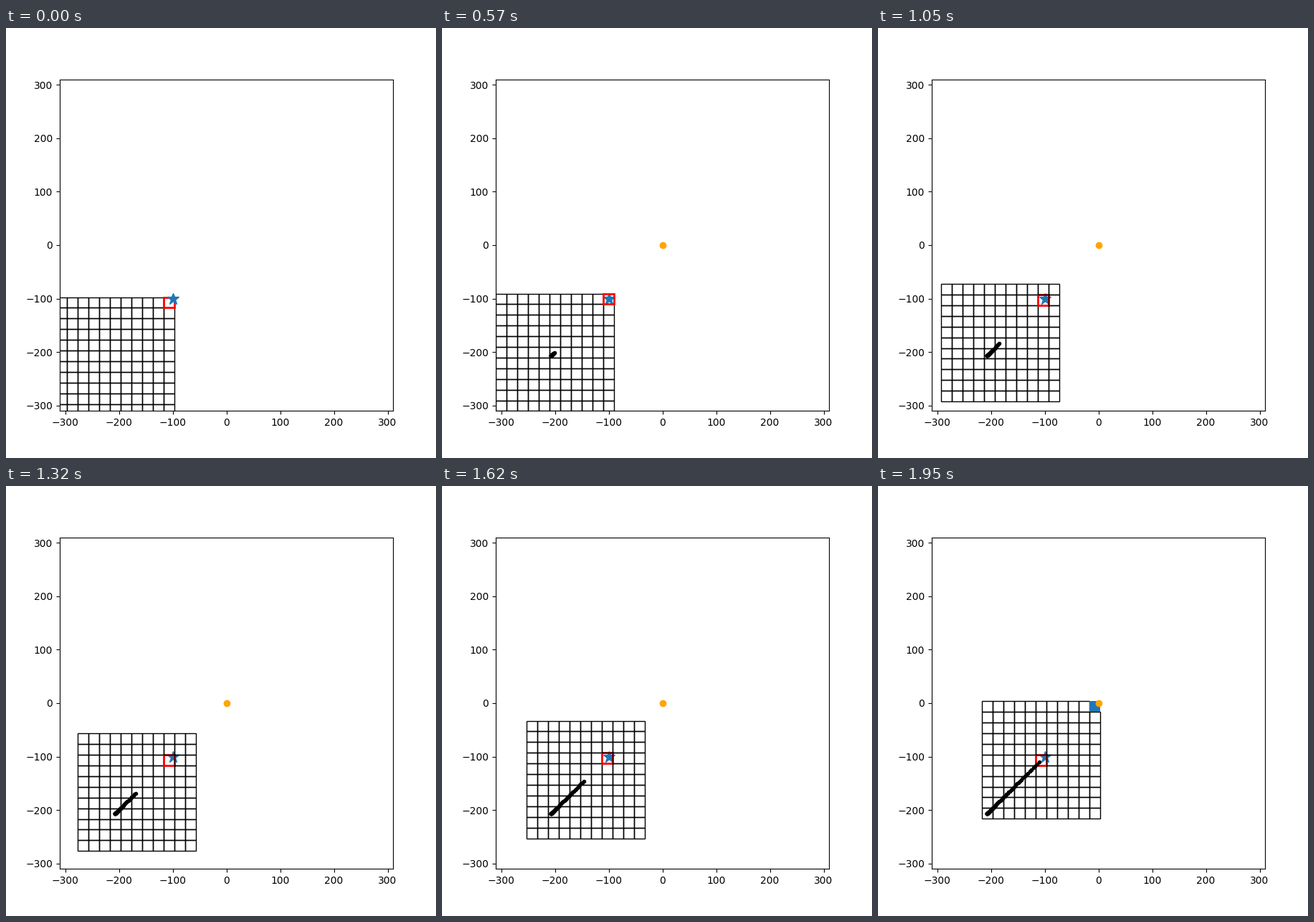
Recreate the animation shown at these times as a matplotlib script. Size 600 by 600 pixels, loop 1980 ms.

```python
import numpy as np
import matplotlib.pyplot as plt
from matplotlib.animation import FuncAnimation
from matplotlib.patches import Rectangle

FRAMES, INTERVAL = 66, 30
CELLS, SIZE = 11, 20
HALF = CELLS * SIZE / 2
START, PULL = 207.3, 1760.0
STAR, GOAL = -100, 0


def fall(steps):
    """Distance to the goal per step, under an inverse-square pull."""
    r, v = START, 0.0
    path = [r]
    for _ in range(steps):
        v -= PULL / r**2 / 2
        r += v
        v -= PULL / r**2 / 2
        path.append(r)
    return -np.array(path)


# The first picture shows the setup; motion starts one frame later.
path = fall(FRAMES - 2)
centre = np.concatenate([path[:1], path])

fig, ax = plt.subplots(figsize=(6, 6), dpi=100)
ax.set_xlim(-310, 310)
ax.set_ylim(-310, 310)

cells = [[ax.add_patch(Rectangle((0, 0), SIZE, SIZE, fill=False))
          for _ in range(CELLS)] for _ in range(CELLS)]
star, = ax.plot([STAR], [STAR], "*", ms=12, color="C0")
trail, = ax.plot([], [], "k.")
goal, = ax.plot([], [], "o", color="orange")


def holds(x, y, p):
    return x <= p < x + SIZE and y <= p < y + SIZE


def style(x, y):
    if holds(x, y, GOAL):
        return dict(fill=True, facecolor="C0", edgecolor="none", linewidth=1)
    if holds(x, y, STAR):
        return dict(fill=False, edgecolor="red", linewidth=2)
    return dict(fill=False, edgecolor="black", linewidth=1)


def draw(n):
    edges = centre[n] - HALF + SIZE * np.arange(CELLS)
    for x, column in zip(edges, cells):
        for y, cell in zip(edges, column):
            cell.set(xy=(x, y), **style(x, y))
    star.set_zorder(0.9 if n else 1.5)
    trail.set_data(centre[:n], centre[:n])
    seen = [GOAL] if n else []
    goal.set_data(seen, seen)
    return ()


anim = FuncAnimation(fig, draw, frames=FRAMES, interval=INTERVAL,
                     init_func=lambda: draw(0), repeat=True, repeat_delay=0)
plt.show()
```
